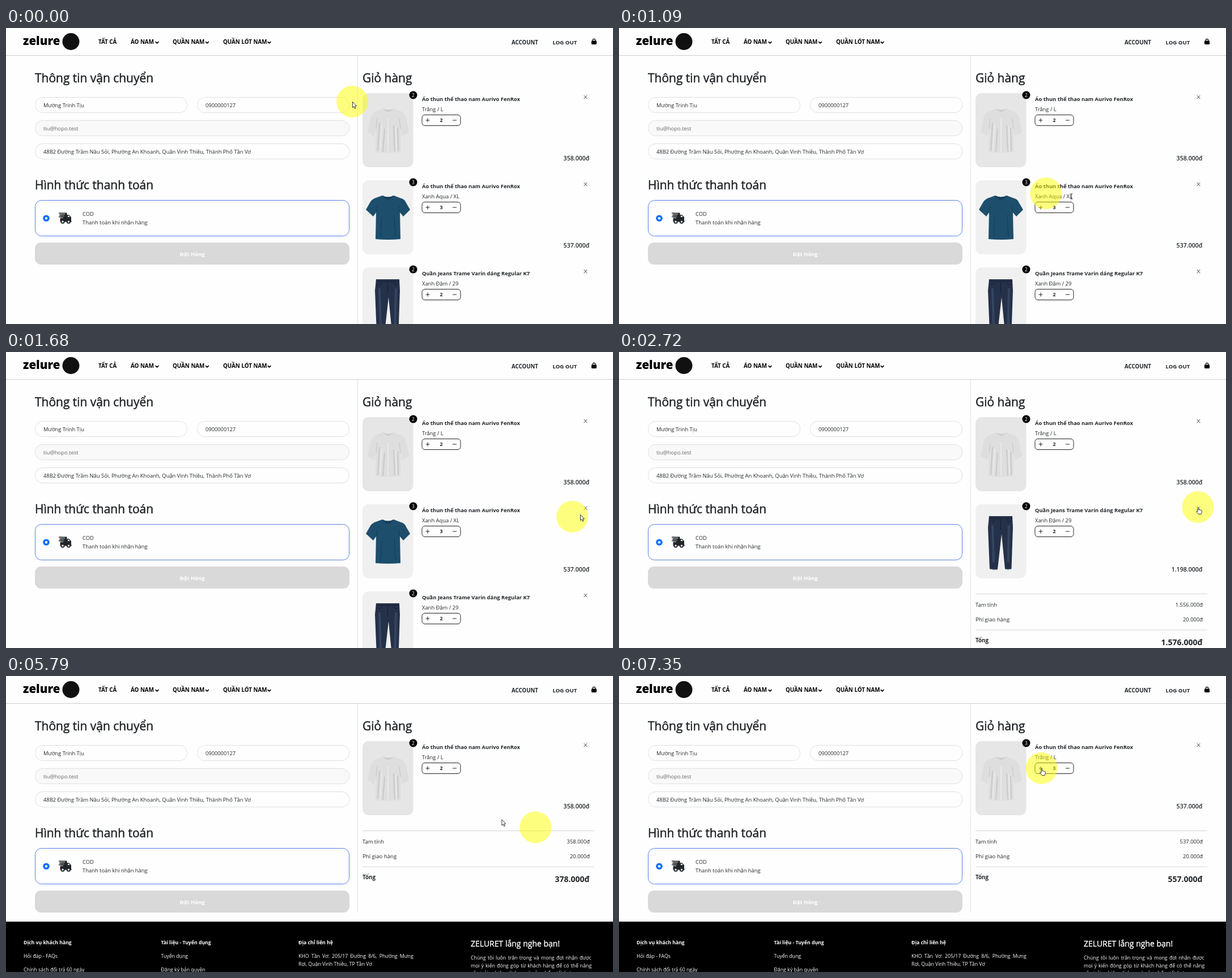
An HTML page for the animation above (8 s loop, 1071 by 523 pixels).

```html
<!DOCTYPE html>
<html lang="vi">
<head>
<meta charset="utf-8">
<title>Giỏ hàng</title>
<style>
html, body { margin: 0; width: 100%; height: 100%; overflow: hidden; background: #fefefe; }
svg { display: block; width: 1071px; height: 523px; font-family: "Open Sans", "Noto Sans", sans-serif; }
</style>
</head>
<body>
<svg id="stage" viewBox="0 0 1071 523" xmlns="http://www.w3.org/2000/svg">
  <g id="page"></g>
  <g id="cart"></g>
  <circle id="halo" r="28" fill="#ff0" fill-opacity=".5"/>
  <g id="pointer">
    <path id="arrow" d="M0 0V10.2L2.3 8.1L3.9 11.8L5.6 11L4 7.4H7Z" fill="#fff" stroke="#222" stroke-width=".9"/>
    <path id="beam" d="M-2 -4.5H-.6Q0 -4.5 0 -3.9Q0 -4.5 .6 -4.5H2M0 -4V4M-2 4.5H-.6Q0 4.5 0 3.9Q0 4.5 .6 4.5H2" fill="none" stroke="#222"/>
    <path id="hand" d="M-.9 .8Q0 -.6 .9 .8V4.4Q2 3.6 2.8 4.7Q3.9 4 4.6 5.1Q6.2 4.7 6.3 6.2V8.4Q6.2 10 5.2 12H.2L-3.2 7.6Q-3.3 6 -1.9 6.5L-.9 7.5Z" fill="#fff" stroke="#222" stroke-width=".9"/>
  </g>
</svg>
<script>
const LOOP = 8000, PITCH = 154, LEAD = 60, INK = '#212529';
const $ = id => document.getElementById(id);

const text = (x, y, s, size = 9.4, more = '') =>
  `<text x="${x}" y="${y}" font-size="${size}" fill="${INK}" ${more}>${s}</text>`;
const bold = (x, y, s, size = 9.4, more = '') => text(x, y, s, size, `font-weight="700" ${more}`);
const title = (x, y, s) => text(x, y, s, 20.95, `stroke="${INK}" stroke-width=".5"`);
const box = (x, y, w, h, r, fill, stroke = 'none') =>
  `<rect x="${x}" y="${y}" width="${w}" height="${h}" rx="${r}" fill="${fill}" stroke="${stroke}"/>`;
const path = (d, fill, stroke = 'none', w = 1, more = '') =>
  `<path d="${d}" fill="${fill}" stroke="${stroke}" stroke-width="${w}" ${more}/>`;
const dot = (x, y, r, fill) => `<circle cx="${x}" cy="${y}" r="${r}" fill="${fill}"/>`;
const END = 'text-anchor="end"', MID = 'text-anchor="middle"';
const WHITE = 'style="fill:#fff"';
const price = k => String(k).replace(/(\d)(\d{3})$/, '$1.$2') + '.000đ';

function header() {
  const menu = [[163, 'TẤT CẢ'], [220, 'ÁO NAM', 266.5], [294, 'QUẦN NAM', 355], [383, 'QUẦN LÓT NAM', 464.5]];
  return bold(30, 30, 'zelure', 20.5, 'style="font-weight:800;fill:#000"') +
    dot(114.5, 24, 15, '#111') +
    menu.map(([x, s, c]) => bold(x, 28, s, 9.8, 'style="fill:#000"') +
      (c ? path(`M${c - 2.8} 24.2l2.8 2.6l2.8 -2.6`, 'none', '#000', 1.8) : '')).join('') +
    bold(892, 28.5, 'ACCOUNT', 9.7) + bold(964.5, 28.5, 'LOG OUT', 9.6) +
    path('M1033 22.5H1042V27.5Q1042 29 1040.5 29H1034.5Q1033 29 1033 27.5Z', '#000') +
    path('M1035.3 24V21.5a2.2 2.2 0 0 1 4.4 0V24', 'none', '#000', 1.2) +
    path('M0 48.5H1071', 'none', '#ccc');
}

function truck() {
  return path('M95.500 326.500H107.500V330H111L115 334V341H116V342.500H95.500Z', INK) +
    path('M95 328.800H104M95 332H102.500M95 335.200H101', 'none', '#fefefe', 1) +
    path('M93 327.300H97M94 330.400H103M93 333.600H102', 'none', INK, 1.5) +
    path('M109 331.500H110.600L113 334H109Z', '#fefefe') +
    [100, 110.5].map(x => dot(x, 342.2, 3.6, INK) + dot(x, 342.2, 1.6, '#fefefe')).join('');
}

function form() {
  const line = '#dee0e4';
  return title(51, 96, 'Thông tin vận chuyển') +
    box(51.5, 122.5, 268, 27, 13, '#fefefe', line) + text(66, 139.5, 'Mường Trinh Tịu') +
    box(337.5, 122.5, 268, 27, 13, '#fefefe', line) + text(352, 139.5, '0900000127', 9.3) +
    box(51.5, 163.5, 554, 27, 13, '#f9f9fa', line) + text(66, 180.8, 'tiu@hopo.test', 9.4, 'style="fill:#666"') +
    box(51.5, 204.5, 554, 27, 13, '#fefefe', line) +
    text(66, 221.7, '48B2 Đường Trầm Nâu Sỏi, Phường An Khoanh, Quận Vinh Thiều, Thành Phố Tần Vơ') +
    title(51, 285, 'Hình thức thanh toán') +
    box(51.5, 304.5, 554, 63, 11, '#fefefe', '#5582e2') +
    dot(71, 336.2, 5.8, '#0d6efd') + dot(71, 336.2, 2.2, '#fff') + truck() +
    text(135, 332, 'COD') + text(135, 347.3, 'Thanh toán khi nhận hàng') +
    box(51, 379, 555, 39, 11, '#d9d9d9') +
    bold(328.7, 402.7, 'Đặt Hàng', 9.5, MID + ' ' + WHITE) +
    title(629, 96, 'Giỏ hàng');
}

// Product pictures, placed for the first row
const whiteTee = () =>
  path('M665 142Q674.500 147 684 142L699 148Q704 151 706 160L711.500 184L699 191L696 178V219Q674 222 652 219L653 178L650 191L638 184L643 160Q646 150 651 148Z', '#dedede') +
  path('M665 142Q674.500 154 684 142Q674.500 147 665 142Z', '#cfcfcf') +
  path('M659 168L656 217M668 178L665 219M684 172L686 218M691 176L692 217', 'none', '#c9c9c9', 2) +
  path('M663 170L660 218M674 160V219M688 174L689 217', 'none', '#e9e9e9', 2) +
  path('M653 178L655 160M696 178L694 160', 'none', '#c6c6c6');
const blueTee = () =>
  path('M664 142Q674 147 684 142L700 148Q704 150 706 155L713 167L701 179L695 172L696 219Q674 221 652 219L653 172L648 179L635 167L643 153Q646 149 650 147Z', '#1d4e6c') +
  path('M664 142Q674 157 684 142Q674 148 664 142Z', '#163e58') +
  path('M653 172L655 160M695 172L693 160M663 180L661 216M685 176L687 215', 'none', '#163f59');
const jeans = () =>
  path('M653 136H694L695 156L692.500 229Q686 231 681 229L675 168L668 230Q661 231 654 229L651 156Z', '#253149') +
  path('M659 152L661 218M688 152L686.500 218', 'none', '#3c4c69', 4, 'opacity=".7"') +
  path('M653 140H694M673.500 140V160M655 144Q660 148 664 141M692 144Q687 148 683 141', 'none', '#141c2e') +
  path('M654 229Q661 231 668 230M681 229Q686 231 692.500 229', 'none', '#5b6473');

const TEE = 'Áo thun thể thao nam Aurivo FenRox';
const goods = {
  white: { name: TEE, kind: 'Trắng / L', unit: 179, back: '#e6e6e6', draw: whiteTee },
  aqua: { name: TEE, kind: 'Xanh Aqua / XL', unit: 179, back: '#f0f0f0', draw: blueTee },
  jeans: { name: 'Quần Jeans Trame Varin dáng Regular K7', kind: 'Xanh Đậm / 29', unit: 599, back: '#f0f0f0', draw: jeans }
};

function row([key, n], i) {
  const g = goods[key];
  return `<g transform="translate(0 ${i * PITCH})">` +
    box(629, 115, 89.5, 131, 11, g.back) + g.draw() +
    dot(718.5, 118.5, 7, '#000') + text(718.5, 121.6, n, 8.4, MID + ' ' + WHITE) +
    bold(734, 129, g.name) + text(734, 147, g.kind) +
    box(734, 153.5, 68, 19, 5, '#fefefe', '#222') +
    path('M740.500 163H747.500M744 159.500V166.500M788 163H795', 'none', '#222') +
    bold(768, 166.3, n, 8.8, MID) + path('M1019.700 119l5.600 6.200m0 -6.200l-5.600 6.200', 'none', '#333', .9) +
    text(1029.5, 233.7, price(g.unit * n), 10.6, END + ' font-weight="600"') + '</g>';
}

function totals(items) {
  const sum = items.reduce((s, [key, n]) => s + goods[key].unit * n, 0);
  return `<g transform="translate(0 ${(items.length - 1) * PITCH})">` +
    path('M629 273.500H1038M629 337H1038', 'none', '#d4d5d7') +
    text(629, 296, 'Tạm tính') + text(1030, 296, price(sum), 9.4, END) +
    text(629, 322, 'Phí giao hàng', 9.6) + text(1030, 322, '20.000đ', 9.4, END) +
    bold(629, 359.3, 'Tổng', 9.8) + bold(1029.5, 364, price(sum + 20), 14, END) + '</g>';
}

function footer() {
  const say = (x, y, s, size = 8.75, more = '') => text(x, y, s, size, WHITE + ' ' + more);
  const head = (x, s) => say(x, 474.3, s, 8.7, 'font-weight="700"');
  return box(0, 434, 1071, 89, 0, '#000') +
    head(31, 'Dịch vụ khách hàng') + say(31, 498, 'Hỏi đáp - FAQs') + say(31, 521.7, 'Chính sách đổi trả 60 ngày') +
    head(273.5, 'Tài liệu - Tuyển dụng') + say(273.5, 498, 'Tuyển dụng') + say(273.5, 521.7, 'Đăng ký bản quyền') +
    head(516, 'Địa chỉ liên hệ') +
    say(516, 498, 'KHO Tần Vơ: 205/17 Đường 8/6, Phường Mưng', 8.75, 'word-spacing="1.9"') +
    say(516, 511.5, 'Rợi, Quận Vinh Thiều, TP Tần Vơ') +
    say(820, 477.7, 'ZELURET lắng nghe bạn!', 14, 'stroke="#fff" stroke-width=".35"') +
    say(820, 501.3, 'Chúng tôi luôn trân trọng và mong đợi nhận được', 8.75, 'word-spacing="1.2"') +
    say(820, 514.8, 'mọi ý kiến đóng góp từ khách hàng để có thể nâng', 8.75, 'word-spacing=".7"') +
    say(820, 528.3, 'cấp trải nghiệm dịch vụ và sản phẩm tốt hơn');
}

const carts = [
  [0, [['white', 2], ['aqua', 3], ['jeans', 2]]],
  [2720, [['white', 2], ['jeans', 2]]],
  [4870, [['white', 2]]],
  [7350, [['white', 3]]]
];

function drawCart(items) {
  const short = items.length === 1;
  return path(`M620.500 49V${short ? 418 : 523}`, 'none', '#dee0e4') +
    items.map(row).join('') + totals(items) + (short ? footer() : '');
}

// Time, x, y of the halo; the pointer runs ahead on the same track
const track = [
  [0, 611, 130], [520, 611, 130], [600, 609, 136], [850, 650, 222], [1090, 752.5, 292], [1150, 797, 297],
  [1270, 905, 298], [1400, 960, 298.5], [1680, 999, 291], [1740, 1013, 287], [1950, 1019, 278],
  [2150, 1021.5, 274], [5500, 1021.5, 274], [5640, 1012, 273], [5790, 935, 267.5], [5850, 875, 253.5],
  [6050, 776, 215], [6270, 737, 188], [6400, 736, 181], [6690, 744, 165], [6800, 745.5, 163], [8000, 745.5, 163]
];

function glide(t, axis) {
  let i = 0;
  while (i < track.length - 2 && track[i + 1][0] <= t) i++;
  const slope = k => k < 0 || k > track.length - 2 ? 0 :
    (track[k + 1][axis] - track[k][axis]) / (track[k + 1][0] - track[k][0]);
  const tangent = k => {
    const a = slope(k - 1), b = slope(k);
    return a * b > 0 ? 2 * a * b / (a + b) : 0;
  };
  const [a, b] = [track[i], track[i + 1]], span = b[0] - a[0];
  const u = Math.min(1, (t - a[0]) / span), v = 1 - u;
  return a[axis] * v * v * (1 + 2 * u) + b[axis] * u * u * (1 + 2 * v) +
    span * u * v * (tangent(i) * v - tangent(i + 1) * u);
}

function pointerAt(x, y, t) {
  const rows = t < 2720 ? 3 : t < 5310 ? 2 : 1;
  const i = Math.floor((y - 115) / PITCH), dy = y - i * PITCH;
  if (i < 0 || i >= rows) return 'arrow';
  if (Math.abs(x - 1022.5) < 6 && Math.abs(dy - 122) < 7) return 'hand';
  if (dy > 153 && dy < 173 && (x > 734 && x < 755 || x > 780 && x < 802)) return 'hand';
  if (dy > 119 && dy < 133 && x > 734 && x < 908) return 'beam';
  if (dy > 137 && dy < 151 && x > 734 && x < 803) return 'beam';
  return 'arrow';
}

let shown = null;
function render(t) {
  const items = carts.filter(c => c[0] <= t).pop()[1];
  if (items !== shown) $('cart').innerHTML = drawCart(shown = items);
  $('halo').setAttribute('cx', glide(t, 1));
  $('halo').setAttribute('cy', glide(t, 2));
  const ahead = Math.min(t + LEAD, LOOP), x = glide(ahead, 1) + .5, y = glide(ahead, 2) + .5;
  const kind = pointerAt(x, y, t);
  $('pointer').setAttribute('transform', `translate(${x} ${y})`);
  for (const id of ['arrow', 'beam', 'hand']) $(id).style.display = id === kind ? '' : 'none';
}

$('page').innerHTML = header() + form();
const start = performance.now();
function tick() {
  render((performance.now() - start) % LOOP);
  requestAnimationFrame(tick);
}
tick();
</script>
</body>
</html>
```
